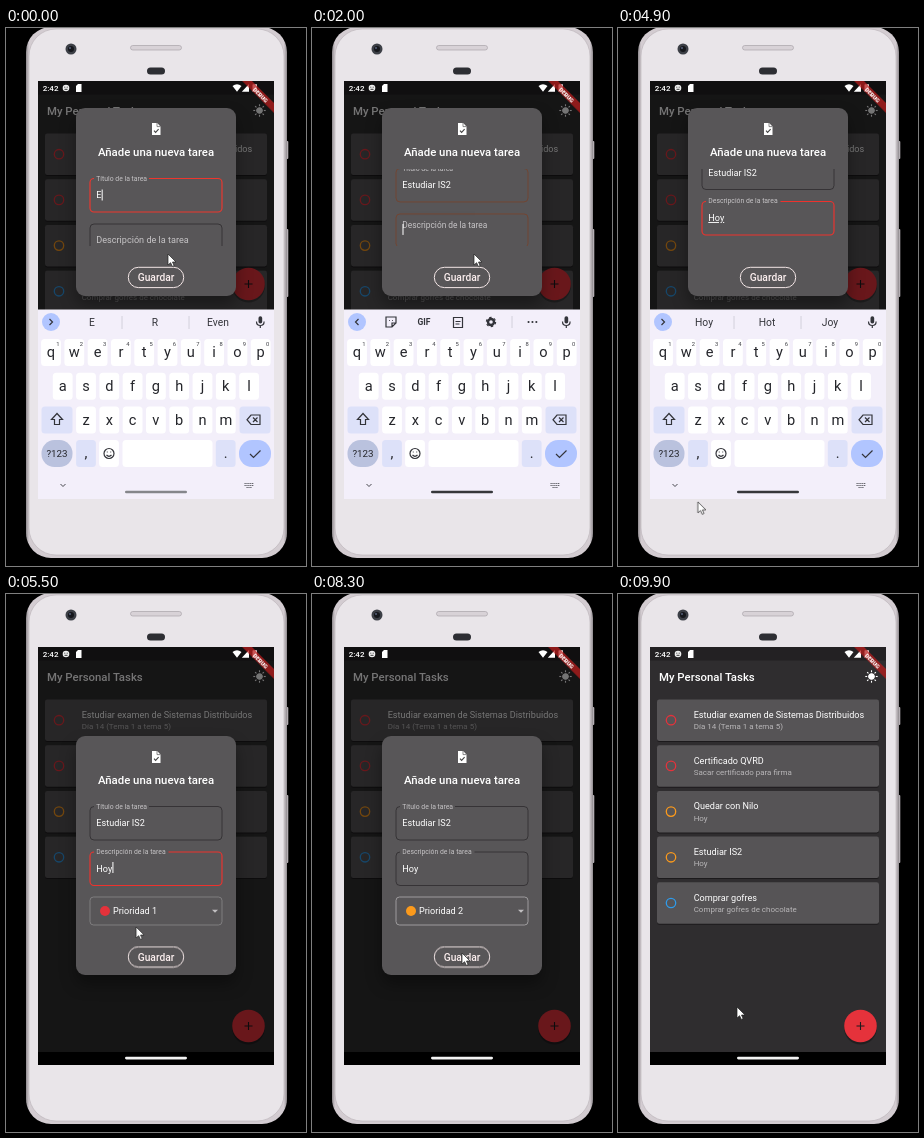
Write an HTML page that moves like this. It is 300 by 538 pixels and loops after 10 s.

```html
<!DOCTYPE html>
<html lang="es">
<head>
<meta charset="utf-8">
<title>Tareas</title>
<style>
html, body { margin: 0; width: 100%; height: 100%; overflow: hidden; background: #000; }
svg { display: block; width: 300px; height: 538px; font-family: Roboto, "Noto Sans", sans-serif; }
text { white-space: pre; }
.t16 { font-size: 9.11px; fill: #fff; }
.sub { font-size: 7.97px; fill: #b9b7b9; }
.label { font-size: 9.11px; fill: #c6c4c6; }
.mid { text-anchor: middle; }
.line { fill: none; stroke-width: .75; }
.ink { fill: none; stroke: #33343a; stroke-width: 1.2; }
.solid { fill: #33343a; }

.anim { animation: 10s linear infinite; }
.step { animation: 10s step-end infinite; }
#mouse { animation-name: mouse; }
#keyboard { animation-name: kbHide; }
#homeBar { animation-name: homeBar; }
#fab { animation-name: fabDrop; }
#barrier { animation-name: barrier; }
#dialog { animation-name: dialogMove, fadeOut; }
#panel { animation-name: panelGrow; }
#clipBox { animation-name: clipGrow; }
#save { animation-name: saveMove; }
#ripple { animation-name: ripple; }
#scroll { animation-name: scroll; }
#titleBox { animation-name: titleBox; }
#descBox { animation-name: descBox; }
#descLabel { animation-name: floatLabel; }
#descNotch { animation-name: notch; }
#pickBox { animation-name: pickBox; }
#menu { animation-name: menu; }
#pick1 { animation-name: hideAt; }
#pick2 { animation-name: showAt; }
#card3 { animation-name: addCard; }
#card4 { animation-name: shiftCard; }

@keyframes mouse {
  0%, 45% { transform: translate(162px, 226px); }
  47% { transform: translate(124px, 350px); }
  49% { transform: translate(80px, 474px); }
  50.3%, 51.5% { transform: translate(57px, 456px); }
  55% { transform: translate(130px, 333px); }
  58%, 61% { transform: translate(158px, 316px); }
  65%, 68% { transform: translate(145px, 352px); }
  70.5%, 74% { transform: translate(141px, 374px); }
  80%, 86% { transform: translate(150px, 359px); }
  93%, 100% { transform: translate(119px, 413px); }
}
@keyframes kbHide {
  0%, 51% { transform: none; animation-timing-function: ease-out; }
  54%, 100% { transform: translateY(192px); }
}
@keyframes homeBar { 0% { fill: #85868b; } 8%, 100% { fill: #36373b; } }
@keyframes fabDrop {
  0%, 51% { transform: translateY(-176px); animation-timing-function: ease-out; }
  54%, 100% { transform: none; }
}
@keyframes barrier { 0%, 85% { opacity: .54; } 88.5%, 100% { opacity: 0; } }
@keyframes fadeOut { 0%, 85% { opacity: 1; } 87.5%, 100% { opacity: 0; } }
@keyframes dialogMove {
  0%, 51% { transform: none; animation-timing-function: ease-out; }
  54%, 100% { transform: translateY(62px); }
}
@keyframes panelGrow {
  0%, 51% { height: 188px; animation-timing-function: ease-out; }
  54%, 100% { height: 239px; }
}
@keyframes clipGrow {
  0%, 51% { height: 76.5px; animation-timing-function: ease-out; }
  54%, 100% { height: 130px; }
}
@keyframes saveMove {
  0%, 51% { transform: none; animation-timing-function: ease-out; }
  54%, 100% { transform: translateY(51.5px); }
}
@keyframes ripple { 0%, 83% { opacity: 0; } 84.5%, 86% { opacity: .15; } 88%, 100% { opacity: 0; } }
@keyframes scroll {
  0%, 19% { transform: none; }
  20% { transform: translateY(-10px); }
  22%, 51% { transform: translateY(-22.5px); animation-timing-function: ease-out; }
  54%, 100% { transform: none; }
}
@keyframes titleBox {
  0%, 19% { stroke: #ee362d; stroke-width: 1.15; }
  20% { stroke: #74452f; stroke-width: .9; }
  22%, 100% { stroke: #2b292b; stroke-width: .75; }
}
@keyframes descBox {
  0%, 19% { stroke: #2b292b; stroke-width: .75; }
  20% { stroke: #74452f; stroke-width: .9; }
  22%, 60% { stroke: #ee322d; stroke-width: 1.15; }
  62%, 100% { stroke: #2b292b; stroke-width: .75; }
}
@keyframes floatLabel {
  0%, 19% { transform: translate(90.3px, 215.2px); }
  20% { transform: translate(90.3px, 209.8px) scale(.92); }
  22%, 100% { transform: translate(90.3px, 197.8px) scale(.75); }
}
@keyframes notch { 0%, 20% { opacity: 0; } 22%, 100% { opacity: 1; } }
@keyframes pickBox { 0%, 60% { stroke: #8d8b8d; } 62%, 100% { stroke: #b4b2b4; } }
@keyframes menu {
  0%, 61% { opacity: 0; clip-path: inset(0 -8px 100% -8px); }
  62% { opacity: 1; }
  64%, 72.5% { opacity: 1; clip-path: inset(0 -8px -8px -8px); }
  75%, 100% { opacity: 0; clip-path: inset(0 -8px -8px -8px); }
}
@keyframes hideAt { 0% { opacity: 1; } 73%, 100% { opacity: 0; } }
@keyframes showAt { 0% { opacity: 0; } 73%, 100% { opacity: 1; } }
@keyframes addCard { 0% { opacity: 0; } 86%, 100% { opacity: 1; } }
@keyframes shiftCard { 0% { transform: translateY(-45.7px); } 86%, 100% { transform: none; } }
</style>
</head>
<body>
<svg viewBox="0 0 300 538">
  <defs>
    <clipPath id="screen"><rect x="32" y="53" width="236" height="418"/></clipPath>
    <clipPath id="fields"><rect id="clipBox" class="anim" x="70" y="141" width="160" height="76.5"/></clipPath>
    <linearGradient id="rim" x2="1" y2="0">
      <stop stop-color="#8f8a8e"/><stop offset=".012" stop-color="#d3ccd1"/>
      <stop offset=".988" stop-color="#d3ccd1"/><stop offset="1" stop-color="#8f8a8e"/>
    </linearGradient>
  </defs>

  <!-- phone -->
  <rect width="300" height="538"/>
  <rect x="279" y="113" width="3.3" height="18" rx="1" fill="#b5afb4"/>
  <rect x="279" y="201" width="3.3" height="68" rx="1" fill="#b5afb4"/>
  <rect x="20" y="-1" width="261" height="531" rx="25" fill="url(#rim)"/>
  <rect x="23" y="1" width="255" height="526" rx="27" fill="#e9e5e9" stroke="#b9b3b8" stroke-width=".6"/>
  <rect x="124.500" y="17.500" width="51" height="4.500" rx="2.250" fill="#d8d2d7" stroke="#aaa4a9" stroke-width=".7"/>
  <circle cx="65" cy="21" r="5.5" fill="#3c3f46"/>
  <circle cx="65" cy="21" r="3" fill="#15171c"/>
  <circle cx="64" cy="20" r="1" fill="#56607a"/>
  <rect x="141" y="39.5" width="18" height="7" rx="3.5" fill="#2d2e33"/>

  <g clip-path="url(#screen)">
    <rect x="32" y="53" width="236" height="418" fill="#2f2d2f"/>
    <rect x="32" y="53" width="236" height="13.5" fill="#232123"/>
    <text x="41" y="87" font-size="11.39" font-weight="500" fill="#fff">My Personal Tasks</text>
    <g id="sun" transform="translate(253.5 82.5)" stroke="#fff" stroke-width="1.1"><circle r="2.8" fill="#fff"/></g>
    <g id="cards"></g>
    <g id="fab" class="anim">
      <circle cx="242.5" cy="434" r="16.5" fill="#000" opacity=".3"/>
      <circle cx="242.5" cy="432" r="16.3" fill="#e5323b"/>
      <path d="M238.5 432h8m-4-4v8" stroke="#1d1b1d" stroke-width="1.1"/>
    </g>
    <rect id="barrier" class="anim" x="32" y="53" width="236" height="418"/>

    <!-- system bars -->
    <text x="36.7" y="63" font-size="8" font-weight="500" fill="#fff">2:42</text>
    <circle cx="60" cy="60" r="3.3" fill="#f0f0f0"/>
    <path d="M58.3 59.2h1m1.4 0h1M58.5 61.3h3" stroke="#222" stroke-width=".9"/>
    <path d="M70 58l2-2h3.5v8H70z" fill="#fff"/>
    <path d="M226.5 58q4.5-3.6 9 0l-4.5 5.7zM243 56v7.7h-7.2z" fill="#fff"/>
    <rect x="246.5" y="56.3" width="4.5" height="7.5" rx=".6" fill="#fff"/>
    <rect x="32" y="458" width="236" height="13"/>
    <rect x="119" y="462.7" width="62" height="2.8" rx="1.4" fill="#f4f4f4"/>

    <!-- dialog -->
    <g id="dialog" class="anim">
      <rect id="panel" class="anim" x="70" y="80" width="160" height="188" rx="9" fill="#585658"
        style="filter: drop-shadow(0 9px 8px rgba(0,0,0,.35))"/>
      <path d="M146 95h5.2l3.3 3.4v8.6H146z" fill="#fff"/>
      <path d="M151 95v3.6h3.5" fill="none" stroke="#585658" stroke-width=".7"/>
      <path d="M148 102.7l1.6 1.7 3-3.3" fill="none" stroke="#444" stroke-width="1.1"/>
      <text class="mid" x="150" y="128" font-size="11.39" font-weight="500" fill="#fff">Añade una nueva tarea</text>
      <g clip-path="url(#fields)">
        <g id="scroll" class="anim">
          <rect id="titleBox" class="line anim" x="84" y="150.5" width="132" height="33.5" rx="4"/>
          <rect x="88" y="147" width="55" height="6" fill="#585658"/>
          <text class="label" x="90.3" y="152.8" style="font-size: 6.83px">Título de la tarea</text>
          <text id="titleText" class="t16" x="90.3" y="170.2"></text>
          <rect id="descBox" class="line anim" x="84" y="196" width="132" height="33.5" rx="4"/>
          <rect id="descNotch" class="anim" x="88" y="193" width="74.5" height="6" fill="#585658"/>
          <text id="descLabel" class="label anim">Descripción de la tarea</text>
          <text id="descText" class="t16" x="90.3" y="215.5"></text>
          <rect id="caret" width="1" height="11" fill="#fff"/>
          <rect id="pickBox" class="line anim" x="84" y="241" width="132" height="28" rx="3.5"/>
          <g id="pick1" class="step"></g>
          <g id="pick2" class="step"></g>
          <path d="M206 253.7h6l-3 3z" fill="#c2c0c2"/>
        </g>
      </g>
      <g id="save" class="anim">
        <rect x="122.3" y="239.3" width="55.4" height="20.3" rx="10.1" fill="none" stroke="#f3e6e6"/>
        <rect id="ripple" class="anim" x="122.3" y="239.3" width="55.4" height="20.3" rx="10.1" fill="#e5323b"/>
        <text class="mid" x="150" y="253" font-size="10.25" font-weight="500" fill="#fbeeee">Guardar</text>
      </g>
      <g id="menu" class="anim">
        <rect x="83" y="269" width="134" height="92" rx="1.5" fill="#454345"
          style="filter: drop-shadow(0 2px 3px rgba(0,0,0,.4))"/>
        <rect x="83" y="274" width="134" height="27" fill="#504e50"/>
      </g>
    </g>

    <!-- keyboard -->
    <g id="keyboard" class="anim">
      <rect x="32" y="281.5" width="236" height="191" fill="#f3effa"/>
      <circle cx="45" cy="294" r="9" fill="#b1c5ff"/>
      <path id="chevron" class="ink"/>
      <g id="hints" font-size="10.3" fill="#33343a">
        <path d="M116 288v13M183 288v13" stroke="#c9cad4" stroke-width=".8"/>
        <text class="mid" x="86" y="298"></text>
        <text class="mid" x="149" y="298"></text>
        <text class="mid" x="212" y="298"></text>
      </g>
      <g id="tools">
        <path class="ink" d="M74 289h10v6l-4 4h-6zM84 295h-4v4M77 292.5h.8m2.4 0h.8"/>
        <text class="mid solid" x="112" y="297" font-size="8.5" font-weight="700">GIF</text>
        <path class="ink" d="M141.5 289.5h9v10h-9zM144 289.5h4M143.5 293.5h5m-5 2.5h4"/>
        <circle class="ink" cx="179" cy="294" r="3" style="stroke-width: 2.4"/>
        <circle class="ink" cx="179" cy="294" r="4.6" stroke-dasharray="2.41 2.41"/>
        <path d="M200 288v12" stroke="#c9cad4" stroke-width=".8"/>
        <path d="M216.5 294h.1m3.8 0h.1m3.8 0h.1" stroke="#33343a" stroke-width="2" stroke-linecap="round"/>
      </g>
      <rect class="solid" x="252.5" y="288.3" width="3.7" height="7.2" rx="1.8"/>
      <path class="ink" d="M250.5 293.5q0 4 3.8 4t3.8-4M254.3 297.5v2.5"/>
      <g id="keys"></g>
      <path class="ink" d="M51 385.5l-5.5 6h3v5h5v-5h3z"/>
      <path class="ink" d="M245 387h9v9.5h-9l-4-4.75zM247 389.5l4.5 4.5m0-4.5l-4.5 4.5"/>
      <circle class="ink" cx="103" cy="425.5" r="5"/>
      <path class="ink" d="M100.8 424h.9m2.6 0h.9M100.5 427q2.5 2.5 5 0"/>
      <path class="ink" d="M244 426l3.5 3.5 7-7"/>
      <path class="ink" d="M54.5 456l2.5 2.5 2.5-2.5" style="stroke-width: .9"/>
      <path d="M238.5 455.5h9m-9 2h9m-7 2h5" stroke="#55565c" stroke-width="1.1" stroke-dasharray="1.2 .7"/>
      <rect id="homeBar" class="anim" x="119" y="462.7" width="62" height="2.6" rx="1.3"/>
    </g>

    <!-- ribbon -->
    <g transform="translate(268.6 53) rotate(45)">
      <rect x="-23" y="16" width="46" height="6.9" fill="#b71c1c" opacity=".75"/>
      <text class="mid" y="21.5" font-size="5.8" font-weight="900" fill="#fff">DEBUG</text>
    </g>
  </g>

  <path id="mouse" class="anim" d="M0 0V11L2.6 8.7 4.3 12.4 6.1 11.6 4.5 8H8z" fill="#fff" stroke="#222" stroke-width=".7"/>
</svg>
<script>
const $ = id => document.getElementById(id);
const add = (id, markup) => $(id).insertAdjacentHTML('beforeend', markup);
const RED = '#e5323b', ORANGE = '#fb9a1c', BLUE = '#2f9bea';

for (let a = 0; a < 360; a += 45)
  add('sun', `<path d="M0-4.3V-6.2" transform="rotate(${a})"/>`);

[
  ['Estudiar examen de Sistemas Distribuidos', 'Día 14 (Tema 1 a tema 5)', RED],
  ['Certificado QVRD', 'Sacar certificado para firma', RED],
  ['Quedar con Nilo', 'Hoy', ORANGE],
  ['Estudiar IS2', 'Hoy', ORANGE],
  ['Comprar gofres', 'Comprar gofres de chocolate', BLUE]
].forEach(([name, note, color], i) => {
  const y = 105.5 + i * 45.7;
  add('cards', `<g id="card${i}" class="${i > 2 ? 'step' : ''}">
    <rect x="39" y="${y + 1}" width="222" height="41.5" rx="2.3" fill="#1c1a1c"/>
    <rect x="39" y="${y}" width="222" height="41.5" rx="2.3" fill="#565456"/>
    <circle cx="53" cy="${y + 20.7}" r="4.7" fill="none" stroke="${color}" stroke-width="1.3"/>
    <text class="t16" x="75.7" y="${y + 18.5}">${name}</text>
    <text class="sub" x="75.7" y="${y + 29.8}">${note}</text></g>`);
});

const option = (id, n, y) => add(id, `
  <circle cx="99" cy="${y}" r="5" fill="${[RED, ORANGE, BLUE][n - 1]}"/>
  <text class="t16" x="107" y="${y + 3.2}">Prioridad ${n}</text>`);
option('pick1', 1, 255);
option('pick2', 2, 255);
[1, 2, 3].forEach(n => option('menu', n, 260.5 + n * 27.3));

function key(x, y, w, char = '', fill = '#fff', size = 14.6, r = 3.5) {
  add('keys', `<rect x="${x - w / 2}" y="${y - 13.5}" width="${w}" height="27" rx="${r}" fill="${fill}"/>
    <text class="mid" x="${x}" y="${y + size * .33}" font-size="${size}" fill="#25262b">${char}</text>`);
}
[['qwertyuiop', 45], ['asdfghjkl', 56.7], ['zxcvbnm', 80]].forEach(([row, x0], r) =>
  [...row].forEach((c, i) => key(x0 + i * 23.3, 324.5 + r * 33.7, 19.8, c)));
for (let i = 0; i < 10; i++)
  add('keys', `<text class="mid" x="${52 + i * 23.3}" y="318" font-size="5.8" fill="#3c3d43">${(i + 1) % 10}</text>`);
const SOFT = '#dde1f9';
key(51, 391.9, 31, '', SOFT);
key(249, 391.9, 31, '', SOFT);
key(51, 425.6, 31, '?123', '#bac2de', 9.8, 13);
key(80, 425.6, 19.8, ',', SOFT);
key(103, 425.6, 19.8);
key(161.5, 425.6, 90);
key(219.7, 425.6, 19.8, '.', SOFT);
key(249, 425.6, 32, '', '#b1c5ff', 10, 13);

// Typing, suggestions and caret
const HINTS = {
  E: 'R Even', Es: 'Est Esp', Est: 'Esta Este', Estu: 'Estudio Estuve', Estud: 'Estudio Estudia',
  Estudi: 'Estudio Estudia', Estudia: 'Estudiar Estudian', Estudiar: 'Estudiara Estudio',
  '': 'en la', I: 'In It', IS: 'Is It', IS2: 'Is ISO', H: 'Hi Hey', Ho: 'How Hot', Hoy: 'Hot Joy'
};
const FOCUS = 1900, DESC = 2900, HIDE = 5100, PICK = 6000;
const typed = (word, t, gap) => t < 0 ? '' : word.slice(0, 1 + Math.floor(t / gap));
const words = $('hints').querySelectorAll('text');

// Underlines the word being composed once it has two letters
function setText(el, text, composing) {
  const start = text.lastIndexOf(' ') + 1;
  const cut = composing && text.length - start > 1 ? start : text.length;
  el.innerHTML = `${text.slice(0, cut)}<tspan text-decoration="underline">${text.slice(cut)}</tspan>`;
}

function render(t) {
  const onTitle = t < FOCUS;
  const title = typed('Estudiar IS2', t, 140);
  const desc = typed('Hoy', t - DESC, 250);
  setText($('titleText'), title, onTitle);
  setText($('descText'), desc, t < HIDE);

  const last = onTitle ? Math.min(t - t % 140, 1540)
    : t < DESC ? FOCUS : Math.min(t - (t - DESC) % 250, 3400);
  const active = $(onTitle ? 'titleText' : 'descText');
  const blink = Math.floor((t - last) / 500) % 2 === 0;
  $('caret').setAttribute('x', 90.5 + (active.textContent ? active.getComputedTextLength() : 0));
  $('caret').setAttribute('y', onTitle ? 161.5 : 206);
  $('caret').style.opacity = t < PICK && blink ? 1 : 0;

  const tools = t >= FOCUS && t < DESC;
  $('tools').style.display = tools ? '' : 'none';
  $('hints').style.display = tools ? 'none' : '';
  $('chevron').setAttribute('d', tools ? 'M46.5 291l-3 3 3 3' : 'M43.5 291l3 3-3 3');
  const word = (onTitle ? title : desc).split(' ').pop();
  [word || 'de', ...HINTS[word].split(' ')].forEach((w, i) => words[i].textContent = w);
}

const start = performance.now();
function tick() {
  render((performance.now() - start) % 10000);
  requestAnimationFrame(tick);
}
tick();
</script>
</body>
</html>
```
